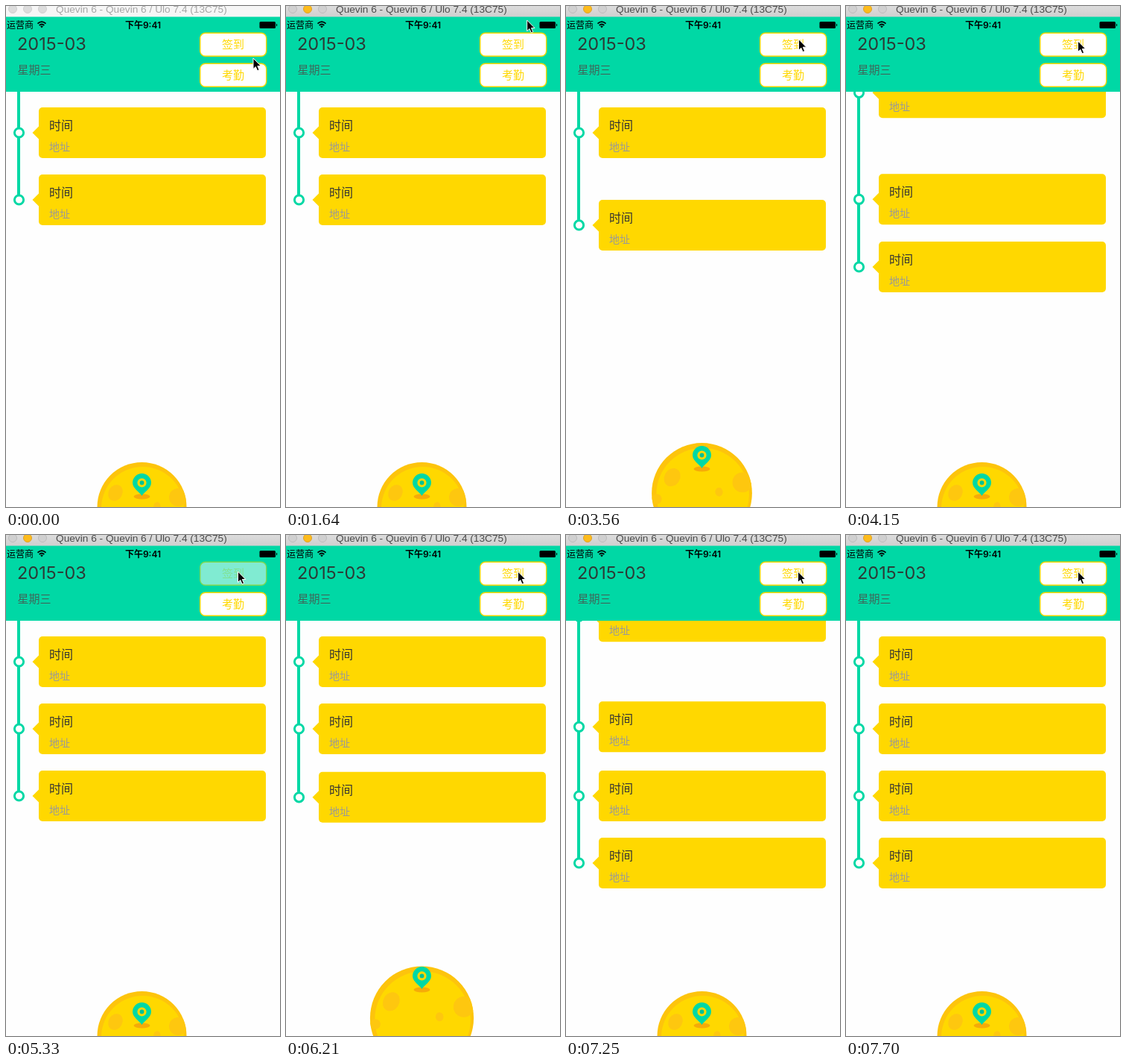
An HTML page for the animation above (8000 ms loop, 368 by 672 pixels).

```html
<!DOCTYPE html>
<html lang="zh-CN">
<head>
<meta charset="utf-8">
<title>签到</title>
<style>
html, body { margin: 0; width: 100%; height: 100%; overflow: hidden; background: #fefefe; }
svg { display: block; font-family: "Noto Sans CJK SC", "Noto Sans CJK", sans-serif; }
.title { font: 13.7px "Liberation Sans", Arial, sans-serif; }
.date { font: 23.5px Inter, sans-serif; }
.clock { font: 600 12px Inter, "Noto Sans CJK SC", "Noto Sans CJK", sans-serif; }
.button rect { fill: #fff; stroke: #ffd800; stroke-width: 1.4; }
.button text { fill: #ffd800; font-size: 15px; text-anchor: middle; }
</style>
</head>
<body>
<svg width="368" height="672" viewBox="0 0 368 672">
  <defs>
    <clipPath id="disc"><circle r="60"/></clipPath>
    <linearGradient id="bar" x2="0" y2="1">
      <stop stop-color="#dcdcdc"/><stop offset="1" stop-color="#cfcfcf"/>
    </linearGradient>
    <g id="card">
      <circle cx="17.5" r="6.1" fill="#fff" stroke="#00d8a5" stroke-width="3"/>
      <path d="M35.5 0L44.5-9V9Z" fill="#ffd800"/>
      <rect x="44" y="-34" width="305" height="68" rx="5" fill="#ffd800"/>
      <text x="58" y="-4" font-size="16" fill="#333">时间</text>
      <text x="58" y="24" font-size="14" fill="#999">地址</text>
    </g>
  </defs>

  <rect width="368" height="672" fill="#fefefe"/>
  <rect id="line" x="15" y="100" width="4" fill="#00d8a5"/>
  <g id="cards"></g>

  <g id="moon">
    <circle r="60" fill="#fdc40c"/>
    <g clip-path="url(#disc)">
      <circle cx="1" cy="1.5" r="55.5" fill="#ffd800"/>
      <g fill="#fec70f">
        <ellipse rx="9.3" ry="11.3" transform="translate(-35.5 -19) rotate(30)"/>
        <circle cx="48.5" cy="-13" r="12"/>
        <ellipse cx="20.5" rx="4.6" ry="5.2" transform="rotate(-4)"/>
        <circle cx="-54" cy="7" r="6"/>
      </g>
    </g>
  </g>
  <g id="pin">
    <ellipse cy="31" rx="11" ry="3.5" fill="#f6ab08"/>
    <path d="M0 30C-3 25-12.5 20-12.5 12.5A12.5 12.5 0 0 1 12.5 12.5C12.5 20 3 25 0 30Z" fill="#00d8a5"/>
    <circle cy="12.5" r="4.5" fill="#00c294" stroke="#ffd800" stroke-width="3.2"/>
  </g>

  <rect y="14" width="368" height="101" fill="#00d8a5"/>
  <rect id="titleBar" width="368" height="14.5"/>
  <g id="lights" stroke-width="1">
    <circle cx="9" cy="4" r="5.5"/><circle cx="29" cy="4" r="5.5"/><circle cx="49" cy="4" r="5.5"/>
  </g>
  <text id="title" class="title" x="67" y="9">Quevin 6 - Quevin 6 / Ulo 7.4 (13C75)</text>

  <text x="1" y="29.5" font-size="12">运营商</text>
  <g fill="none" stroke="#000" stroke-width="1.8">
    <path d="M42.5 23.6Q48 18.6 53.5 23.6M44.7 26Q48 23 51.3 26"/>
    <path d="M46.2 27.3Q48 25.8 49.8 27.3L48 29.4Z" fill="#000" stroke="none"/>
  </g>
  <text class="clock" x="184" y="29.5" text-anchor="middle">下午9:41</text>
  <rect x="340.5" y="21" width="21.5" height="9" rx="1.5"/>
  <path d="M363 23.5Q365.5 25.5 363 27.5Z"/>

  <text class="date" x="15" y="58.7" fill="#2c3a36">2015-03</text>
  <text x="15.5" y="91" font-size="15" fill="#3f665a">星期三</text>
  <g id="signIn" class="button">
    <rect x="260.7" y="36.2" width="89" height="31" rx="7"/><text id="signText" x="305" y="57">签到</text>
  </g>
  <g class="button">
    <rect x="260.7" y="77.2" width="89" height="31" rx="7"/><text x="305" y="98">考勤</text>
  </g>
  <path id="cursor" d="M0 0V14.5L3.3 11.5L5.6 16.8L8.1 15.7L5.8 10.5H10.3Z" stroke="#fff"/>
</svg>
<script>
const $ = id => document.getElementById(id);
const clamp = x => Math.min(1, Math.max(0, x));
const ease = x => (1 - Math.cos(Math.PI * clamp(x))) / 2;
const LOOP = 8000;
const taps = [{ down: 2740, up: 2750 }, { down: 5190, up: 5590 }];
const cursorPath = [ // time, x, y
  [0, 332, 70], [300, 332, 70], [380, 331, 69], [1340, 328, 4], [1900, 320, 32],
  [2360, 312.5, 44], [4000, 312.5, 45], [4150, 311.5, 47], [5040, 311.5, 47], [5190, 311.5, 49], [LOOP, 311.5, 49]
];

const cards = [0, 1, 2, 3].map(() => {
  const card = document.createElementNS("http://www.w3.org/2000/svg", "use");
  card.setAttribute("href", "#card");
  return $("cards").appendChild(card);
});

const set = (el, name, value) => el.setAttribute(name, value);
const move = (el, x, y, more = "") => set(el, "transform", `translate(${x} ${y}) ${more}`);

// Each tap shifts the cards one slot down, lowest card first.
const cardY = (k, t) => 260 - 90 * k +
  90 * taps.reduce((sum, tap) => sum + ease((t - tap.up - 569 - 290 * k) / 575), 0);

// The moon is thrown up, then falls a little more slowly.
function jump(t) {
  if (t < 0 || t > 1110) return 0;
  const d = t - 500;
  return 1 - (d / (d < 0 ? 500 : 610)) ** 2;
}

function highlight({ down, up }, t) {
  return t < down ? 0 : 1 - ease((t - up - 100) / 350);
}

function drawCursor(t) {
  const i = cursorPath.findIndex(p => p[0] > t);
  const [t0, x0, y0] = cursorPath[i - 1], [t1, x1, y1] = cursorPath[i];
  const f = (t - t0) / (t1 - t0);
  move($("cursor"), x0 + (x1 - x0) * f, y0 + (y1 - y0) * f);
  set($("cursor"), "visibility", t >= 450 && t < 1340 ? "hidden" : "visible");
}

function drawTitleBar(active) {
  set($("titleBar"), "fill", active ? "url(#bar)" : "#f6f6f6");
  set($("title"), "fill", active ? "#4c4c4c" : "#a6a6a6");
  [...$("lights").children].forEach((light, i) => {
    const lit = active && i === 1;
    set(light, "fill", lit ? "#fdbc1c" : active ? "#d0d0d0" : "#dcdcdc");
    set(light, "stroke", lit ? "#e0a32a" : active ? "#bcbcbc" : "#d0d0d0");
  });
}

function draw(t) {
  cards.forEach((card, k) => move(card, 0, cardY(k, t)));
  set($("line"), "height", cardY(0, t) - 107);

  const u = Math.max(...taps.map(tap => jump(t - tap.up)));
  move($("moon"), 182.5, 672 - 25 * u, `scale(${1 + u / 6})`);
  move($("pin"), 182.5, 627 - 50 * u);

  const h = Math.max(...taps.map(tap => highlight(tap, t)));
  set($("signIn"), "opacity", 1 - h / 2);
  set($("signText"), "opacity", 1 - h / 2);

  drawTitleBar(t >= 1640);
  drawCursor(t);
}

function tick() {
  draw(performance.now() % LOOP);
  requestAnimationFrame(tick);
}
tick();
</script>
</body>
</html>
```
